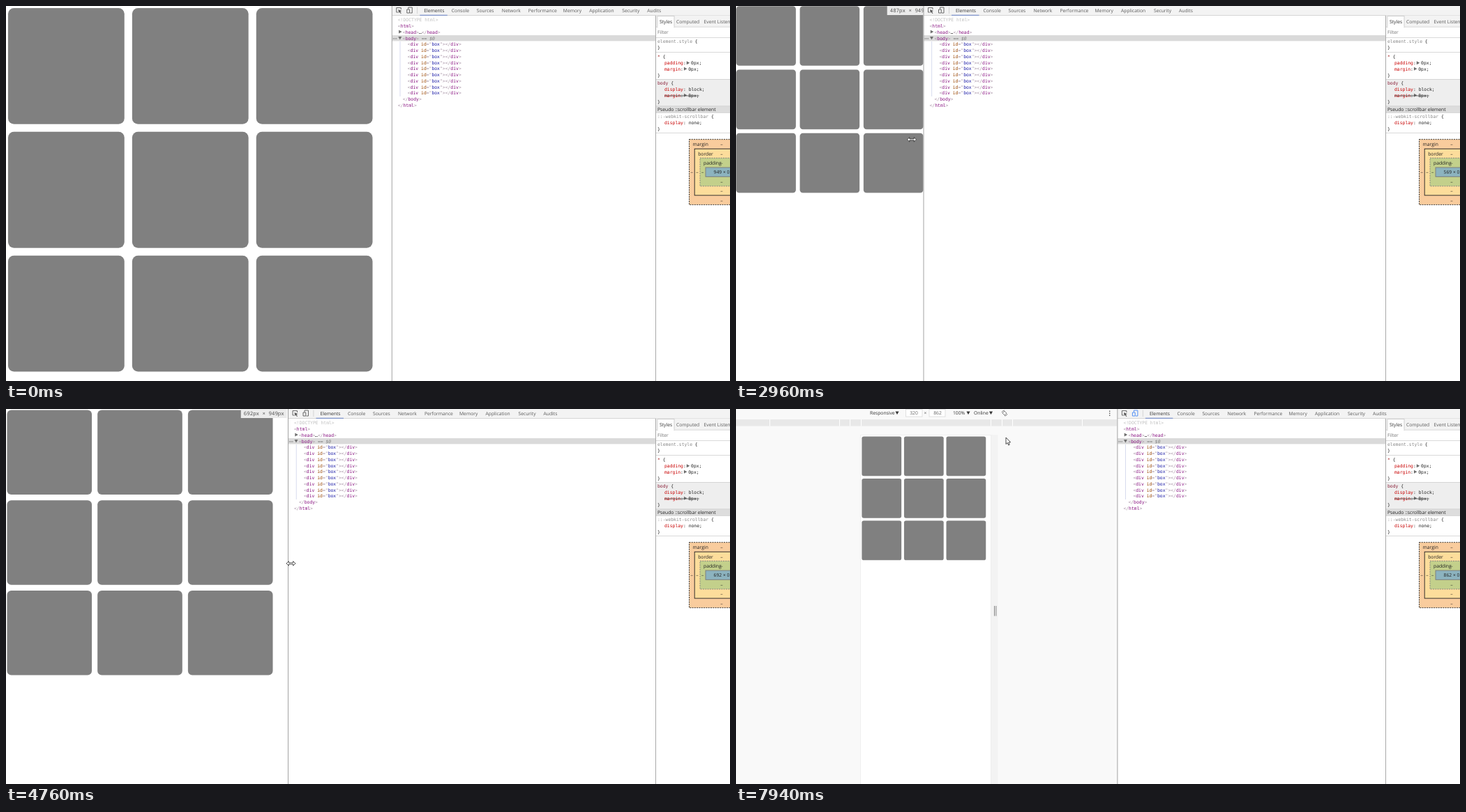
Write an HTML page with a canvas that moves like this. It is 1038 px wide and 539 px high and loops after 8000 ms.

```html
<!DOCTYPE html>
<html lang="en">
<head>
<meta charset="utf-8">
<title>Responsive grid</title>
<style>
html, body { margin: 0; width: 100%; height: 100%; overflow: hidden; background: #fff; }
canvas { display: block; }
</style>
</head>
<body>
<canvas id="stage" width="1038" height="539"></canvas>
<script>
const ctx = document.getElementById('stage').getContext('2d');
const W = 1038, H = 539, LOOP = 8000;
const SCALE = 0.5858, ORIGIN = -2.6, SIDEBAR = 931.5, LAG = 38;
const SANS = '6.75px "Open Sans", sans-serif';
const MONO = '6.4px "DejaVu Sans Mono", monospace';
const ITALIC = 'italic ' + MONO;
const LABEL = '7.45px "Noto Sans Mono", monospace';
const TIP = '7.6px "Open Sans", sans-serif';
const TAG = '#881280', BRACKET = '#a894a6', ATTR = '#994500', VALUE = '#1a1aa6';
const INK = '#222', PROP = '#c80000', GREY = '#888', RULE = '#ccc';

// Screen updates come in bursts: [first, last, count].
const BURSTS = [[170, 860, 10], [1010, 1480, 7], [1730, 2490, 11], [2570, 2570, 1],
  [2750, 3500, 11], [3600, 4310, 10], [4460, 5230, 11], [5390, 5540, 3], [5690, 5690, 1],
  [5860, 6570, 10], [6810, 6950, 3], [7110, 7870, 11], [7940, 7940, 1]];

// [time, divider x]
const DRAG = [[1690, 553.3], [2034, 422.7], [2072, 412], [2110, 400], [2414, 330.7],
  [2700, 330.7], [2899, 282.7], [2937, 269], [2975, 248], [3424, 187.8], [3600, 187.8],
  [4234, 402.8], [4692, 402.8], [4730, 404.5], [4768, 404.5], [5150, 540], [5350, 540],
  [5464, 546.9]];

// [time, x, y]; x follows the divider while dragging
const POINTER = [[170, 1001, 529], [640, 506, 215], [700, 520, 208], [860, 567, 215],
  [1480, 557, 221], [1730, 557, 221], [2110, 557, 198], [2960, 557, 192], [3600, 557, 190],
  [4310, 551, 222], [5780, 551, 222], [5980, 600, 126], [6137, 586, 64], [6175, 578, 41],
  [6540, 572, 5], [7110, 572, 3], [7400, 585, 40], [7870, 501, 61], [7940, 387, 41]];

const WIDTHS = [[0, 949], [2570, 569], [3600, 325], [4460, 692], [5690, 938], [6950, 862]];
const TABS = [['Elements', 46], ['Console', 85.5], ['Sources', 121.5], ['Network', 157.5],
  ['Performance', 195.5], ['Memory', 245.5], ['Application', 283], ['Security', 330], ['Audits', 366]];

function burstTime(t) {
  let shown = 0;
  for (const [first, last, count] of BURSTS) {
    if (t < first) break;
    const step = (last - first) / (count - 1) || 1;
    shown = first + step * Math.min(count - 1, Math.floor((t - first) / step + 0.3));
  }
  return shown;
}

function track(keys, t) {
  const next = keys.findIndex(k => k[0] > t);
  if (next === 0) return keys[0].slice(1);
  if (next < 0) return keys[keys.length - 1].slice(1);
  const a = keys[next - 1], b = keys[next], p = (t - a[0]) / (b[0] - a[0]);
  return a.slice(1).map((v, i) => v + (b[i + 1] - v) * p);
}

const dividerAt = t => track(DRAG, t)[0];
const rowY = i => 20 + 8.76 * i;
const rowAt = y => Math.round((y - 20) / 8.76);

function rect(x, y, w, h, color) {
  ctx.fillStyle = color;
  ctx.fillRect(x, y, w, h);
}

function frame(x, y, w, h, fill, stroke, dash = []) {
  rect(x, y, w, h, fill);
  ctx.setLineDash(dash);
  ctx.strokeStyle = stroke;
  ctx.lineWidth = 0.9;
  ctx.strokeRect(x, y, w, h);
  ctx.setLineDash([]);
}

function poly(points, fill, stroke) {
  ctx.beginPath();
  points.forEach(([x, y]) => ctx.lineTo(x, y));
  ctx.closePath();
  ctx.fillStyle = fill;
  ctx.fill();
  if (!stroke) return;
  ctx.strokeStyle = stroke;
  ctx.lineWidth = 0.8;
  ctx.stroke();
}

function line(d, x, y, color, width = 0.9) {
  ctx.save();
  ctx.translate(x, y);
  ctx.strokeStyle = color;
  ctx.lineWidth = width;
  ctx.stroke(new Path2D(d));
  ctx.restore();
}

// Draws coloured runs one after another, vertically centred on y.
function runs(x, y, font, ...parts) {
  ctx.font = font;
  for (let i = 0; i < parts.length; i += 2) {
    ctx.fillStyle = parts[i + 1];
    ctx.fillText(parts[i], x, y + 2.3);
    x += ctx.measureText(parts[i]).width;
  }
  return x;
}

function centred(text, x, y, color) {
  ctx.textAlign = 'center';
  runs(x, y, SANS, text, color);
  ctx.textAlign = 'left';
}

const right = (x, y, c = '#6e6e6e') => poly([[x, y - 2.5], [x + 4.5, y], [x, y + 2.5]], c);
const down = (x, y, c = '#6e6e6e') => poly([[x, y - 2], [x + 5, y - 2], [x + 2.5, y + 2.5]], c);

function cell(i, x, y, width) {
  const unit = width * SCALE / 100;
  return { x: x + unit + (i % 3) * 32 * unit, y: y + unit + Math.floor(i / 3) * 32 * unit, size: 30 * unit, margin: unit };
}

function box({ x, y, size }, color) {
  ctx.beginPath();
  ctx.roundRect(x, y, size, size, size * 0.05);
  ctx.fillStyle = color;
  ctx.fill();
}

function grid(x, y, width) {
  for (let i = 0; i < 9; i++) box(cell(i, x, y, width), '#808080');
}

function highlight(c) {
  const x = c.x - c.margin, y = c.y - c.margin, size = c.size + 2 * c.margin;
  rect(x, y, size, size, '#f9cc9d');
  box(c, '#8ba680');
  const above = y + size + 20 > H;
  const edge = above ? y - 0.5 : y + size + 0.5, dir = above ? -1 : 1;
  const left = Math.max(0, x), top = above ? edge - 19 : edge + 5;
  ctx.beginPath();
  ctx.roundRect(left + 0.5, top, 97, 14, 1);
  ctx.fillStyle = '#343640';
  ctx.fill();
  poly([[left + 4.5, edge + 5 * dir], [left + 9.5, edge], [left + 14.5, edge + 5 * dir]], '#343640');
  runs(left + 4.5, top + 7, TIP, 'div', '#d9a9e0', '#box', '#f5a868');
  rect(left + 36, top + 3, 0.7, 8, '#777');
  runs(left + 40.5, top + 7, TIP, '281.39×281.39', '#eee');
}

function sizeLabel(width) {
  const x = ORIGIN + width * SCALE - 66;
  rect(x, 0, 66, 13, '#ebebeb');
  runs(x + 4, 6.3, LABEL, width + 'px × 949px', '#555');
}

function deviceView(ready) {
  rect(0, 0, 547, H, '#f9f9f9');
  rect(0, 15, 546, 9.5, '#e8e8e8');
  for (const d of [93, 109, 124, 224]) {
    rect(272 - d, 15, 1, 9.5, '#fff');
    rect(272 + d, 15, 1, 9.5, '#fff');
  }
  const chooser = (text, x, arrow) => {
    runs(x, 6, SANS, text, '#333');
    down(arrow, 5.5, '#333');
  };
  chooser('Responsive', 192, 228.5);
  frame(243.5, 0.5, 23.5, 10.5, '#fff', '#ddd');
  frame(277, 0.5, 23, 10.5, '#fff', '#ddd');
  centred('320', 255, 6, '#666');
  centred('×', 271.5, 6, '#666');
  centred('862', 289, 6, '#666');
  chooser('100%', 311, 330.5);
  chooser('Online', 341, 363);
  line('M-3,0 L0,-3 L3,0 L0,3 Z M-4,-1 Q-3,-4 0,-4 M4,1 Q3,4 0,4', 385, 6, '#666', 0.8);
  for (const y of [2.5, 5.5, 8.5]) rect(535, y, 1.4, 1.4, '#555');

  frame(178.5, 37.5, 187, H, '#fff', '#eee');
  rect(366, 37, 9.5, H, '#f3f3f3');
  rect(370, 283, 0.9, 14.5, '#777');
  rect(372.4, 283, 0.9, 14.5, '#777');
  if (ready) grid(178.5, 37.5, 323);
}

function toolbar(d, deviceOn) {
  rect(d, 0, W - d, 13, '#f3f3f3');
  rect(d, 13, W - d, 0.8, RULE);
  line('M3,7 H0.5 V0.5 H7 V3', d + 6, 2, '#5a5a5a');
  poly([[d + 9, 5], [d + 14, 7], [d + 12, 8], [d + 13.5, 10.5], [d + 12.5, 11], [d + 11.2, 8.8], [d + 10, 10]], '#5a5a5a');
  line('M2,3 V0.5 H7.5 V8.5 H4.5 M0,3.5 H3.8 V8.5 H0 Z', d + 21.5, 1.5, deviceOn ? '#4285f4' : '#5a5a5a');
  rect(d + 36, 1.5, 0.8, 9.5, RULE);
  TABS.forEach(([name, x], i) => runs(d + x, 6.3, SANS, name, i ? '#5a5a5a' : '#333'));
  rect(d + 40, 12.7, 39.5, 1.1, '#7089c9');
}

function tree(d, hoverRow) {
  const tag = (x, i, name, rest = '') =>
    runs(d + x, rowY(i), MONO, rest === '/' ? '</' : '<', BRACKET, name, TAG, '>', BRACKET);
  rect(d, rowY(3) - 4.3, SIDEBAR - d, 8.4, '#dadada');
  if (hoverRow >= 0 && hoverRow < 15 && hoverRow !== 3)
    rect(d + 1.5, rowY(hoverRow) - 4.3, 929 - d - 1.5, 8.6, '#ebf2fb');
  rect(d + 11.3, 51, 0.8, 87 - 8, '#cdd3ea');

  runs(d + 8.5, rowY(0), MONO, '<!DOCTYPE html>', '#c0c0c0');
  tag(8.5, 1, 'html');
  right(d + 9.8, rowY(2) - 0.4);
  let x = tag(15.5, 2, 'head');
  runs(x, rowY(2), MONO, '…', INK, '</', BRACKET, 'head', TAG, '>', BRACKET);
  for (const k of [0, 1, 2]) rect(d + 1.6 + k * 2.1, rowY(3) + 0.1, 1.1, 1.1, '#666');
  down(d + 9, rowY(3) - 0.3);
  x = tag(15.5, 3, 'body');
  runs(x, rowY(3), ITALIC, ' == $0', '#7d7d7d');
  for (let i = 4; i < 13; i++)
    runs(d + 22.5, rowY(i), MONO, '<', BRACKET, 'div', TAG, ' id', ATTR, '="', BRACKET, 'box', VALUE,
      '"></', BRACKET, 'div', TAG, '>', BRACKET);
  tag(15.5, 13, 'body', '/');
  tag(8.5, 14, 'html', '/');
}

function styleRule(y, selector, color, declarations) {
  runs(934, y, MONO, selector, color, ' {', INK);
  declarations.forEach(([name, value, expands, struck], i) => {
    const rowTop = y + 9 + i * 8.4;
    let x = runs(944, rowTop, MONO, name, PROP, expands ? ':' : ': ', INK);
    if (expands) {
      right(x + 1, rowTop - 0.2);
      x += 7.3;
    }
    x = runs(x, rowTop, MONO, value + ';', INK);
    if (struck) rect(944, rowTop + 0.2, x - 944, 0.8, '#444');
  });
  runs(934, y + 9 + declarations.length * 8.6, MONO, '}', INK);
}

function boxModel(width) {
  const mid = 1026, cy = 238.7;
  const layers = [
    ['margin', 46.5, 47, '#f9cc9d', '#222', [2, 1.3]],
    ['border', 38.8, 33.4, '#fddd9b', '#222', []],
    ['padding', 31, 20.2, '#c3d08b', '#808080', [2, 1.3]],
    ['', 23, 6.6, '#8cb3bf', '#7a7a7a', []]
  ];
  layers.forEach(([name, hw, hh, fill, stroke, dash]) => {
    frame(mid - hw, cy - hh, hw * 2, hh * 2, fill, stroke, dash);
    if (!name) return;
    runs(mid - hw + 5, cy - hh + 7, SANS, name, INK);
    centred('–', mid, cy - hh + 7, INK);
    centred('–', mid, cy + hh - 6.3, INK);
    centred('–', mid - hw + 3.8, cy + 0.3, INK);
  });
  centred(width + ' × 0', mid, cy, INK);
}

function sidebar(width) {
  rect(SIDEBAR, 13.8, W - SIDEBAR, H, '#fff');
  rect(SIDEBAR, 13.8, W - SIDEBAR, 16, '#f3f3f3');
  rect(SIDEBAR, 29.7, W - SIDEBAR, 0.8, RULE);
  frame(934, 14.5, 24, 16, '#fff', RULE);
  rect(934.5, 29, 23, 2, '#fff');
  runs(937, 22.5, SANS, 'Styles', '#333');
  runs(961, 22.5, SANS, 'Computed', '#5a5a5a');
  runs(1000.5, 22.5, SANS, 'Event Listeners', '#5a5a5a');
  runs(934, 38, SANS, 'Filter', '#777');
  rect(SIDEBAR, 105, W - SIDEBAR, 38.5, '#eee');
  rect(SIDEBAR, 143.5, W - SIDEBAR, 9.5, '#ddd');
  for (const y of [45, 66, 105, 143.5, 153, 182]) rect(SIDEBAR, y, W - SIDEBAR, 0.8, '#d0d0d0');
  styleRule(51, 'element.style', GREY, []);
  styleRule(73, '*', '#a02020', [['padding', '0px', true], ['margin', '0px', true]]);
  styleRule(111, 'body', '#8a2038', [['display', 'block'], ['margin', '8px', true, true]]);
  runs(934, 148.4, SANS, 'Pseudo ::scrollbar element', INK);
  styleRule(159, '::-webkit-scrollbar', GREY, [['display', 'none']]);
  boxModel(width);
  rect(SIDEBAR - 0.5, 13.8, 1, H, '#a9a9a9');
}

function arrow(x, y) {
  poly([[0, 0], [0, 9.5], [2.2, 7.5], [3.7, 11], [5.2, 10.3], [3.8, 7], [6.6, 6.8]]
    .map(([dx, dy]) => [x + dx, y + dy]), '#fff', '#222');
}

function resizer(x, y) {
  const half = [[-6.5, 0], [-3.2, -3.2], [-3.2, -1], [3.2, -1], [3.2, -3.2],
    [6.5, 0], [3.2, 3.2], [3.2, 1], [-3.2, 1], [-3.2, 3.2]];
  poly(half.map(([dx, dy]) => [x + dx, y + dy]), '#fff', '#222');
}

function draw(now) {
  const t = burstTime(now % LOOP);
  const divider = dividerAt(t - LAG);
  const pageWidth = Math.round((dividerAt(t - 2 * LAG) - ORIGIN) / SCALE);
  const dragging = t >= 1480 && t < 5800;
  const deviceOn = t >= 6810;
  let [x, y] = track(POINTER, t);
  if (dragging) x = dividerAt(t) + 4;

  ctx.textRendering = 'geometricPrecision';
  rect(0, 0, W, H, '#fff');
  if (deviceOn) {
    deviceView(t >= 7100);
  } else {
    grid(ORIGIN, ORIGIN, pageWidth);
    const hovered = rowAt(track(POINTER, t - LAG)[1]) - 4;
    if (t >= 5860 && hovered >= 0 && hovered < 9) highlight(cell(hovered, ORIGIN, ORIGIN, pageWidth));
    if (t >= 1730 && t < 6560) sizeLabel(pageWidth);
  }

  rect(divider, 0, W - divider, H, '#fff');
  toolbar(divider, deviceOn);
  const overTree = t >= 5860 && x > divider && y > 15;
  tree(divider, overTree ? rowAt(y) : -1);
  rect(divider - 0.5, 0, 1, H, '#a3a3a3');
  sidebar(WIDTHS.filter(k => k[0] <= t + 1).pop()[1]);

  if (t >= 170) (t > 1080 && t < 5800 ? resizer : arrow)(x, y);
}

function tick() {
  draw(performance.now());
  requestAnimationFrame(tick);
}
tick();
</script>
</body>
</html>
```
